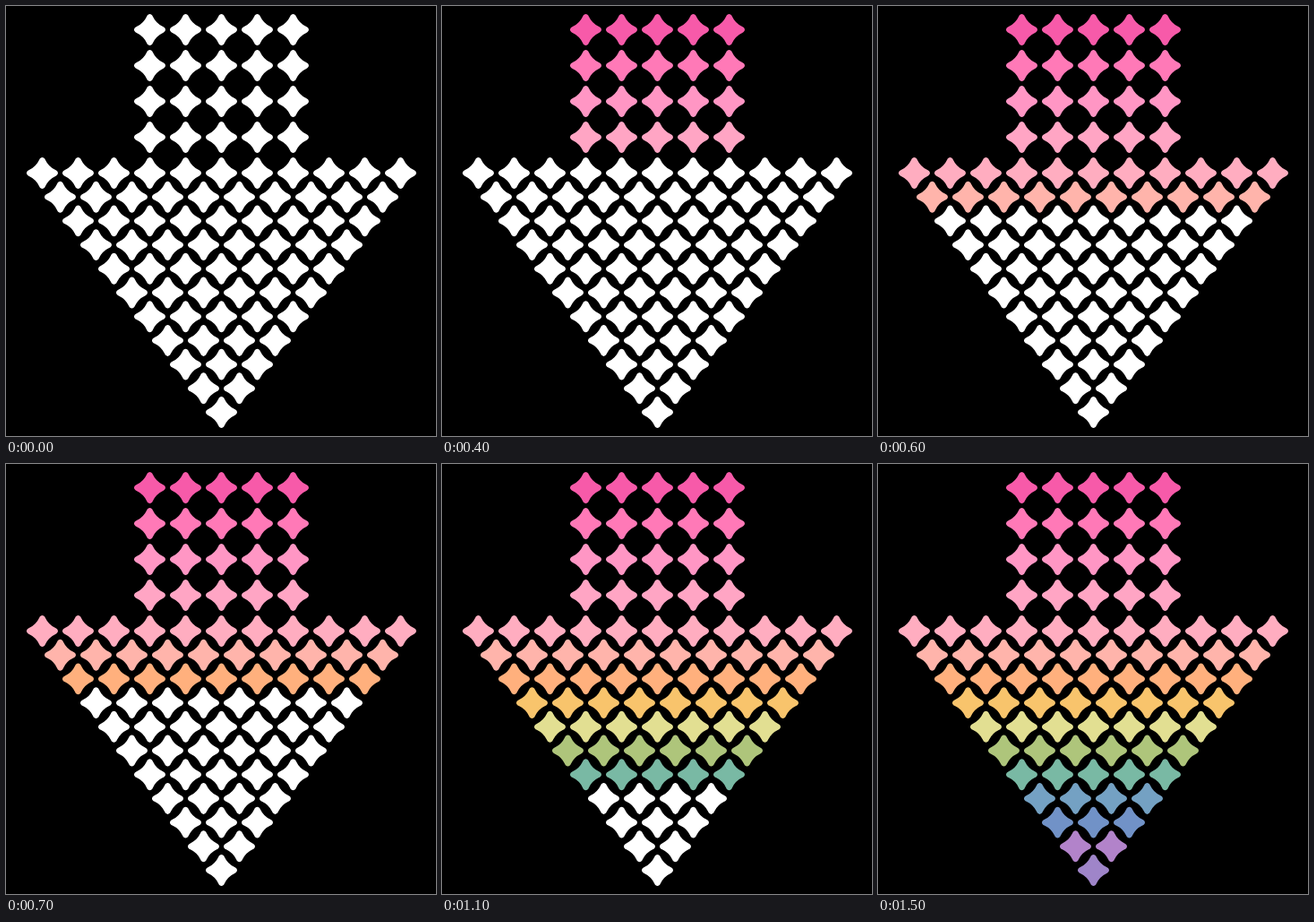
Recreate the animation shown at these times as an HTML page with a canvas. Size 480x480 px, loop 2000 ms.

```html
<!DOCTYPE html>
<html lang="en">
<head>
<meta charset="utf-8">
<title>Arrow of stars</title>
<style>
  html, body { margin: 0; width: 100%; height: 100%; overflow: hidden; background: #000; }
  canvas { display: block; }
</style>
</head>
<body>
<canvas id="stage" width="480" height="480"></canvas>
<script>
const ctx = document.getElementById('stage').getContext('2d');
const LOOP = 2000, STEP = 100, SPACING = 40;
const CENTER_X = 240.5, TOP = 26.5, SHAFT_ROWS = 4, HEAD_WIDTH = 11, HEAD_PITCH = 26.7;

const colors = [
  '#f75aa9', '#ff79b7', '#ff96c4', '#ffa5c4', '#ffadc0',
  '#ffb4ab', '#ffb07d', '#f8c46c', '#e2df92', '#aec57b',
  '#79b9a4', '#74a1c3', '#7192c7', '#b283ca', '#9f85c9'
];

// Four rounded tips joined by concave sides.
function makeStar() {
  const path = new Path2D();
  path.moveTo(-3.4, -14.7);
  for (let i = 0; i < 4; i++) {
    const turn = (x, y) => [[x, y], [-y, x], [-x, -y], [y, -x]][i];
    path.bezierCurveTo(...turn(-2, -18.4), ...turn(2, -18.4), ...turn(3.4, -14.7));
    path.quadraticCurveTo(...turn(7, -7), ...turn(14.7, -3.4));
  }
  path.closePath();
  return path;
}

const star = makeStar();

const rows = colors.map((color, i) => {
  const headRow = i - SHAFT_ROWS;
  return headRow < 0
    ? { color, count: 5, y: TOP + i * SPACING }
    : { color, count: HEAD_WIDTH - headRow, y: TOP + SHAFT_ROWS * SPACING + headRow * HEAD_PITCH };
});

function drawRow({ count, y }, fill) {
  ctx.fillStyle = fill;
  for (let i = 0; i < count; i++) {
    ctx.setTransform(1, 0, 0, 1, CENTER_X + (i - (count - 1) / 2) * SPACING, y);
    ctx.fill(star);
  }
}

function draw(time) {
  const lit = Math.floor((time % LOOP) / STEP);
  ctx.setTransform(1, 0, 0, 1, 0, 0);
  ctx.fillStyle = '#000';
  ctx.fillRect(0, 0, 480, 480);
  rows.forEach((row, i) => drawRow(row, i < lit ? row.color : '#fff'));
}

const start = performance.now();
function tick() {
  draw(performance.now() - start);
  requestAnimationFrame(tick);
}
tick();
</script>
</body>
</html>
```
